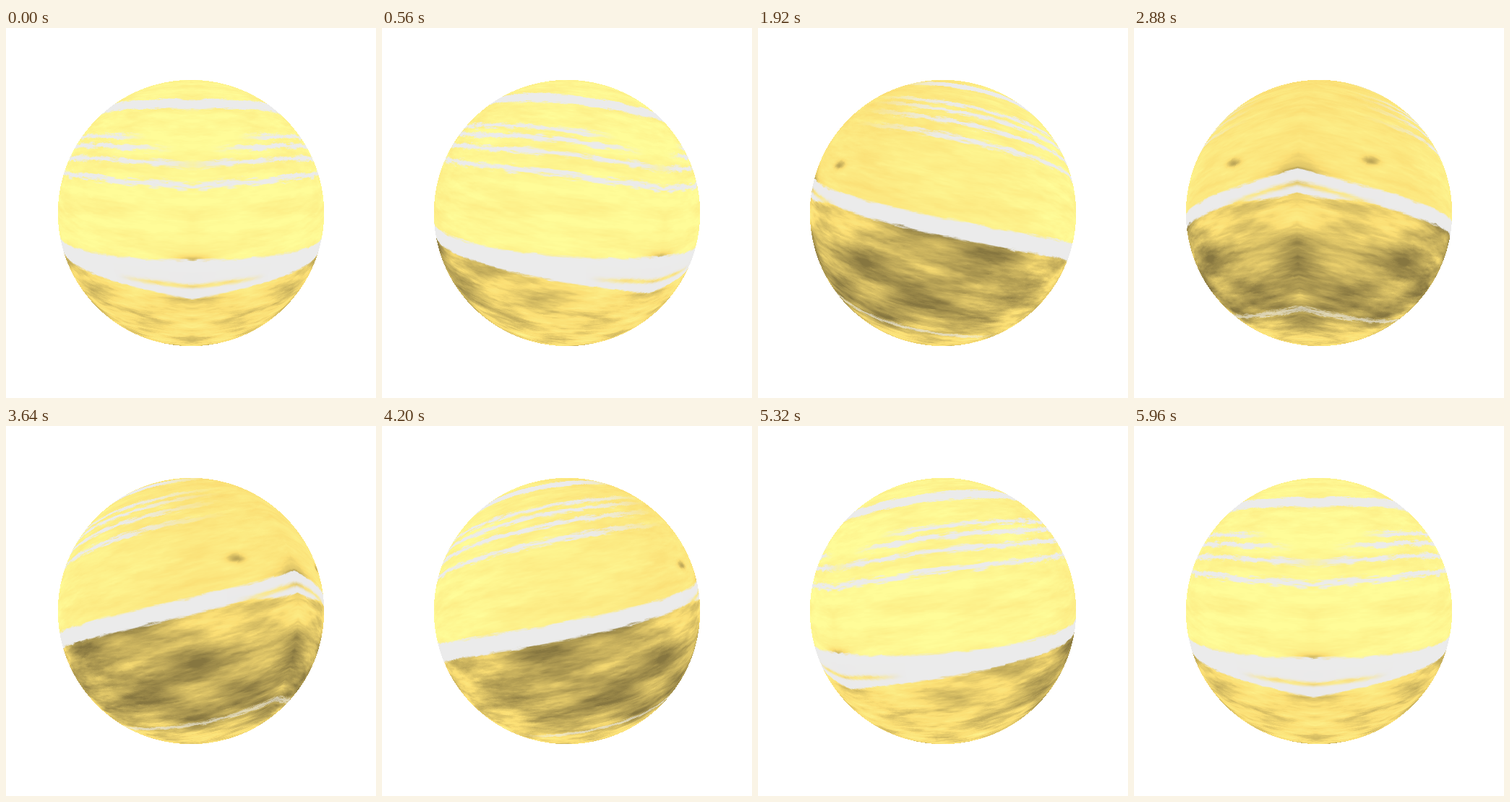
An HTML page with a canvas for the animation above (6 s loop, 512 px wide and 512 px high).

```html
<!DOCTYPE html>
<html>
<head>
<meta charset="utf-8">
<style>
html, body { margin: 0; width: 100%; height: 100%; overflow: hidden; background: #fff; }
canvas { display: block; width: 512px; height: 512px; }
</style>
</head>
<body>
<canvas id="stage" width="512" height="512"></canvas>
<script>
const LOOP = 6000, STEP = 40, SIZE = 512, MID = 256;
const RADIUS = 184.2, DIST = 2.9, FOCAL = RADIUS * Math.sqrt(DIST * DIST - 1);
const DEG = 180 / Math.PI, RES = 4, TOP = 72, COLS = 180 * RES + 1, ROWS = 2 * TOP * RES + 1;
const DARK = [134, 118, 64], GOLD = [251, 222, 116], PALE = [255, 252, 152], WHITE = [235, 235, 235];
const GOLD_AT = 0.6, BELT = -21.6;

const clamp = x => Math.max(0, Math.min(1, x));
const mix = (a, b, k) => a + (b - a) * k;
const blend = (a, b, k) => a.map((c, i) => mix(c, b[i], k));
const smooth = (a, b, x) => { const k = clamp((x - a) / (b - a)); return k * k * (3 - 2 * k); };
const bump = x => Math.exp(-x * x);

function hash(x, y) {
  let h = Math.imul(x, 374761393) + Math.imul(y, 668265263);
  h = Math.imul(h ^ (h >>> 13), 1274126177);
  return ((h ^ (h >>> 16)) >>> 0) / 4294967296;
}
function noise(x, y) {
  const i = Math.floor(x), j = Math.floor(y), a = smooth(0, 1, x - i), b = smooth(0, 1, y - j);
  return mix(mix(hash(i, j), hash(i + 1, j), a), mix(hash(i, j + 1), hash(i + 1, j + 1), a), b) * 2 - 1;
}
const fbm = (x, y) => noise(x, y) * 0.55 + noise(x * 2, y * 2 + 40) * 0.3 + noise(x * 4, y * 4 + 90) * 0.2;

// The cloud lines climb from the front seam to the back one
const slant = lon => 0.09 * lon + 0.00052 * lon * lon;

// Brightness, 0 dark to 1 pale
function shade(lon, lat, u, top, seam, rough, fine) {
  if (u > BELT) {
    const base = mix(0.95, 0.72, smooth(40, 175, lon)) - 0.06 * smooth(20, 55, lat);
    const peak = 0.5 * Math.exp(-Math.max(0, u - top) / 3) * bump(seam / 8);
    const eye = 0.5 * bump((lon - 156) / 3.5) * bump((lat - 16.7) / 1.8);
    return base - peak - eye + rough * 0.13 + fine * 0.05;
  }
  const base = mix(mix(0.6, 0.24, smooth(30, 115, lon)), 0.6, smooth(36, 56, -lat));
  const glow = 0.36 * smooth(115, 170, lon) * smooth(-41, -34, u);
  const cells = Math.cos((lon - 164) / 41 * 2 * Math.PI) * Math.cos((lat + 15) / 26 * 2 * Math.PI);
  return base + glow + cells * 0.15 + rough * 0.22 + fine * 0.08;
}

// Amount of white cloud
function cloud(lon, u, top, seam, rough, fine) {
  const streak = (level, half) => smooth(-0.6, 0.6, half - Math.abs(u - level + rough * 0.5) + fine * 1.3);
  const bottom = 2 * BELT - top - 2.6 * smooth(160, 175, lon);
  const gap = bump((u - BELT + 2.1 + fine * 0.4) / 0.8) * (1 - smooth(12, 28, seam));
  const belt = smooth(-0.5, 0.5, Math.min(top - u, u - bottom) + fine * 0.6) * (1 - 0.9 * gap);

  const fade = 1 - smooth(110, 160, lon);
  let white = Math.max(belt, streak(39.5, 3) * fade, streak(-66, 1) * smooth(75, 100, lon) * 0.6);
  // Thin lines, closer together further north
  for (let k = 0; k < 4; k++)
    white = Math.max(white, streak(8 + 7 * k - 0.6 * k * k, 0.9) * smooth(10 * k - 15, 10 * k, lon) * fade);
  return white;
}

function surface(lon, lat) {
  const u = lat - slant(lon), seam = Math.min(lon, 180 - lon);
  const top = BELT + 2.4 + 4.8 * Math.exp(-lon / 40);
  const rough = fbm(lon / 13, u / 3), fine = fbm(lon / 4 + 70, u / 0.7);
  const v = clamp(shade(lon, lat, u, top, seam, rough, fine));
  const base = v < GOLD_AT ? blend(DARK, GOLD, v / GOLD_AT) : blend(GOLD, PALE, (v - GOLD_AT) / (1 - GOLD_AT));
  const [r, g, b] = blend(base, WHITE, cloud(lon, u, top, seam, rough, fine));
  return (255 << 24 | b << 16 | g << 8 | r) >>> 0;
}

const skin = new Uint32Array(COLS * ROWS);
for (let j = 0; j < ROWS; j++)
  for (let i = 0; i < COLS; i++) skin[j * COLS + i] = surface(i / RES, TOP - j / RES);

// Where each pixel's ray meets the ball
const hits = [];
for (let y = 0; y < SIZE; y++) for (let x = 0; x < SIZE; x++) {
  const dx = x + 0.5 - MID, dy = y + 0.5 - MID;
  if (dx * dx + dy * dy >= RADIUS * RADIUS) continue;
  const a = dx * dx + dy * dy + FOCAL * FOCAL, b = DIST * FOCAL;
  const t = (b - Math.sqrt(Math.max(0, b * b - a * (DIST * DIST - 1)))) / a;
  const lat = -Math.asin(t * dy) * DEG, lon = Math.atan2(t * dx, DIST - t * FOCAL) * DEG;
  hits.push([y * SIZE + x, Math.round((TOP - lat) * RES) * COLS, lon]);
}

const ctx = document.getElementById('stage').getContext('2d');
const image = ctx.createImageData(SIZE, SIZE);
const pixels = new Uint32Array(image.data.buffer).fill(0xffffffff);
let shown = -1;

function draw(now) {
  const step = Math.floor((now % LOOP) / STEP);
  if (step !== shown) {
    shown = step;
    const turn = step * STEP / LOOP * 360 + 0.5;
    for (const [at, row, lon] of hits) {
      const l = (lon - turn + 720) % 360;
      pixels[at] = skin[row + Math.round(Math.min(l, 360 - l) * RES)];
    }
    ctx.putImageData(image, 0, 0);
  }
  requestAnimationFrame(draw);
}
draw(0);
</script>
</body>
</html>
```
